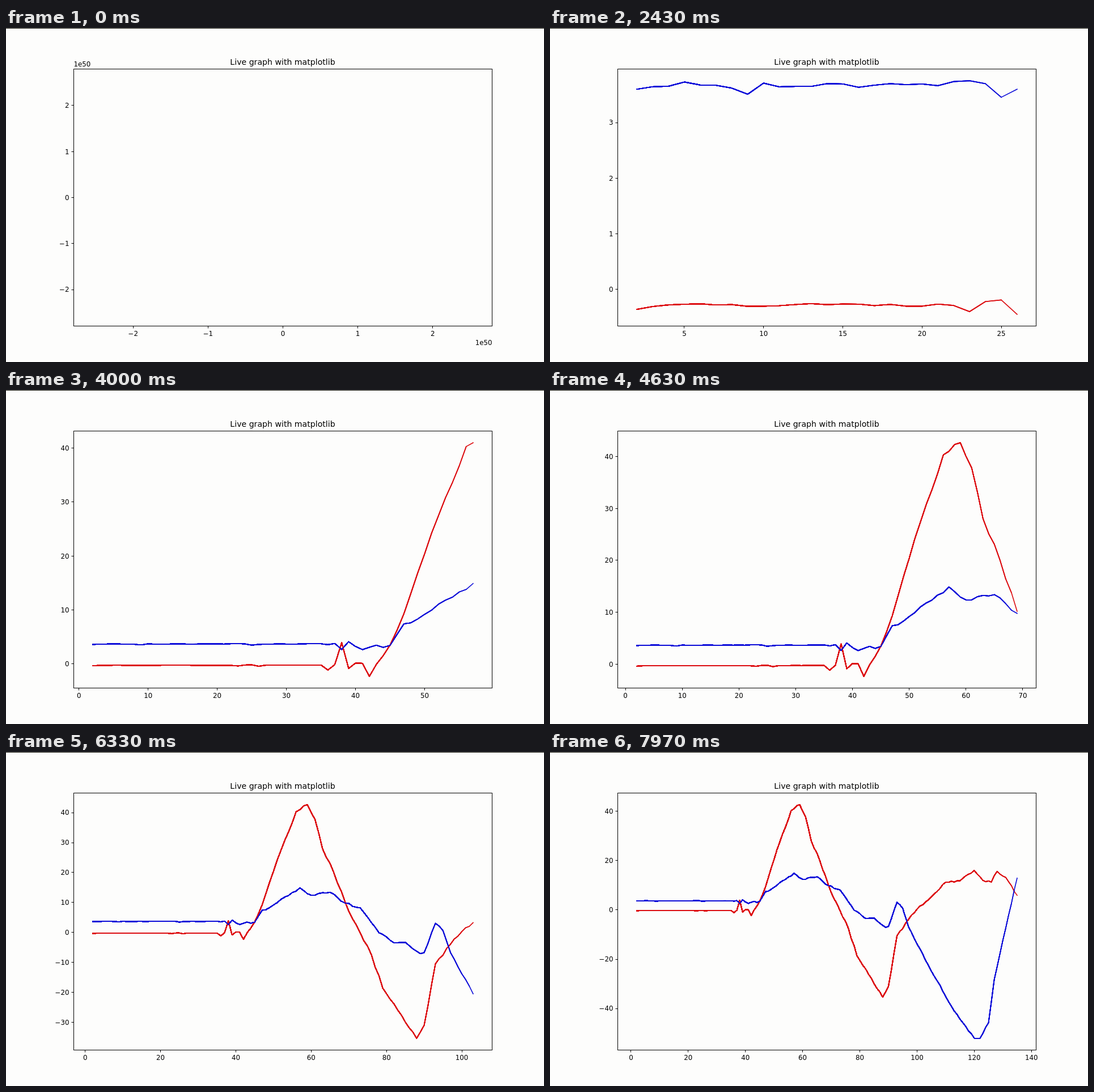
An HTML page with a canvas that plays this animation: 949x590 px, repeating every 8000 ms.

```html
<!DOCTYPE html>
<html lang="en">
<head>
<meta charset="utf-8">
<title>Live graph</title>
<style>
  html, body { margin: 0; width: 100%; height: 100%; overflow: hidden; background: #fdfdfc; }
  canvas { display: block; }
</style>
</head>
<body>
<canvas id="stage" width="949" height="590"></canvas>
<script>
const ctx = document.getElementById('stage').getContext('2d');
const LOOP = 8000;
const LEFT = 119.5, RIGHT = 857.5, TOP = 72.5, BOTTOM = 526.5;
const INK = '#000', PAPER = '#fdfdfc';
const FIRST_X = 2, LAST_X = 135, QUIET_UNTIL = 35;

// Turning points [x, y] of each curve; the samples between them follow by rule.
const redKeys = [
  [2, -.36], [4, -.28], [22, -.29], [23, -.4], [24, -.22], [25, -.19], [26, -.45], [27, -.26],
  [35, -.22], [36, -1.15], [37, -.15], [38, 3.92], [39, -.87], [40, .14], [41, .09], [42, -2.33],
  [45, 3.5], [47, 9.31], [52, 27.5], [56, 40.3], [59, 42.65], [61, 37.8], [63, 28], [66, 20],
  [70, 7], [76, -7.5], [79, -18.6], [88, -35.4], [90, -31], [93, -10.5], [98, -2.2], [110, 11.2],
  [115, 11.8], [120, 16], [123, 12], [126, 11.3], [128, 15.6], [131, 13.2], [135, 5.9]];
const blueKeys = [
  [2, 3.6], [5, 3.73], [9, 3.51], [10, 3.71], [12, 3.65], [24, 3.7], [25, 3.455], [26, 3.6],
  [37, 3.77], [38, 2.66], [39, 4.11], [41, 2.63], [42, 3.06], [45, 3.44], [47, 7.42], [48, 7.6],
  [57, 14.9], [60, 12.4], [65, 13.4], [69, 9.8], [73, 8.2], [78, -.1], [82, -3.5], [85, -3.3],
  [89, -7.1], [90, -6.75], [93, 3.05], [95, .6], [97, -6.75], [103, -20.5], [113, -41], [120, -52],
  [122, -52.1], [125, -45.8], [127, -28.3], [130, -12.4], [135, 12.9]];

function seededRandom(seed) {
  return () => (seed = seed * 16807 % 2147483647) / 2147483647;
}

// Straight runs between the turning points, roughened by sensor noise.
function makeSeries(keys, seed, quietNoise, activeNoise) {
  const random = seededRandom(seed), series = [];
  for (let x = FIRST_X, k = 0; x <= LAST_X; x++) {
    if (k < keys.length - 2 && x > keys[k + 1][0]) k++;
    const [[x0, y0], [x1, y1]] = keys.slice(k, k + 2);
    const noise = (random() * 2 - 1) * (x <= QUIET_UNTIL ? quietNoise : activeNoise);
    const onKey = x === x0 || x === x1;
    series.push(y0 + (y1 - y0) * (x - x0) / (x1 - x0) + (onKey ? 0 : noise));
  }
  return series;
}

const red = makeSeries(redKeys, 4711, 0.03, 0.45);
const blue = makeSeries(blueKeys, 977, 0.06, 0.3);

// While no data exists, every redraw widens the limits by a tenth.
const EMPTY_UNTIL = 1220, EMPTY_EXPONENT = 50;
const emptyLimit = step => 2.793 * 1.1 ** step;

function withMargin(min, max) {
  if (min === max) { min *= 0.95; max *= 1.05; }
  const pad = (max - min) * 0.05;
  return [min - pad, max + pad];
}

// At most nine intervals, at a round step.
function getTicks([min, max]) {
  const raw = (max - min) / 9;
  const mag = 10 ** Math.floor(Math.log10(raw));
  const step = [1, 2, 2.5, 5, 10].find(s => s * mag >= raw) * mag;
  const values = [];
  for (let i = Math.ceil(min / step); i * step <= max; i++) values.push(i * step);
  return { step, values };
}

function decimalsFor(step) {
  let d = 0;
  while (d < 4 && Math.abs(step * 10 ** d - Math.round(step * 10 ** d)) > 1e-6) d++;
  return d;
}

function text(str, x, y, align, size = 11.8) {
  ctx.font = `${size}px "DejaVu Sans", sans-serif`;
  ctx.textAlign = align;
  ctx.fillText(str, x, y);
}

function segment(x1, y1, x2, y2) {
  ctx.beginPath();
  ctx.moveTo(x1, y1);
  ctx.lineTo(x2, y2);
  ctx.stroke();
}

const snap = v => Math.floor(v) + 0.5;

function drawAxis(range, toPixel, isX, isEmpty) {
  const { step, values } = getTicks(range);
  const order = isEmpty ? Math.floor(Math.log10(Math.max(...values)) + 1e-9) : 0;
  const scale = 10 ** order, digits = decimalsFor(step / scale);
  for (const value of values) {
    const p = toPixel(value);
    const str = (value < 0 ? '\u2212' : '') + (Math.abs(value) / scale).toFixed(digits);
    if (isX) {
      segment(snap(p), BOTTOM, snap(p), BOTTOM + 4);
      text(str, p, 544, 'center');
    } else {
      segment(LEFT - 4, snap(p), LEFT, snap(p));
      text(str, LEFT - 8, Math.round(p + 4.3), 'right');
    }
  }
  if (isEmpty) {
    const str = '1e' + (EMPTY_EXPONENT + order);
    if (isX) text(str, RIGHT, 560, 'right');
    else text(str, LEFT, 68, 'left');
  }
}

// Each redraw adds another copy of the lines, so older parts look heavier.
function drawLines(count, px, py) {
  ctx.lineWidth = 1.6;
  ctx.lineJoin = 'round';
  ctx.lineCap = 'square';
  for (let n = 2; n <= count; n++) {
    for (const [series, color] of [[red, '#dc0c10'], [blue, '#0c0cd8']]) {
      ctx.strokeStyle = color;
      ctx.beginPath();
      for (let i = 0; i < n; i++) ctx.lineTo(px(FIRST_X + i), py(series[i]));
      ctx.stroke();
    }
  }
}

function draw(isEmpty, step) {
  let xRange, yRange;
  const count = isEmpty ? 0 : step;
  if (isEmpty) {
    const limit = emptyLimit(step);
    xRange = yRange = [-limit, limit];
  } else {
    const shown = [...red.slice(0, count), ...blue.slice(0, count)];
    xRange = withMargin(FIRST_X, FIRST_X + count - 1);
    yRange = withMargin(Math.min(...shown), Math.max(...shown));
  }
  const px = x => LEFT + (x - xRange[0]) / (xRange[1] - xRange[0]) * (RIGHT - LEFT);
  const py = y => BOTTOM - (y - yRange[0]) / (yRange[1] - yRange[0]) * (BOTTOM - TOP);

  ctx.fillStyle = PAPER;
  ctx.fillRect(0, 0, 949, 590);
  ctx.fillStyle = '#1e1e14';
  ctx.fillRect(0, 0, 949, 1);

  drawLines(count, px, py);

  ctx.fillStyle = ctx.strokeStyle = INK;
  ctx.lineWidth = 1;
  ctx.lineCap = 'butt';
  ctx.lineJoin = 'miter';
  ctx.strokeRect(LEFT, TOP, RIGHT - LEFT, BOTTOM - TOP);
  drawAxis(xRange, px, true, isEmpty);
  drawAxis(yRange, py, false, isEmpty);
  text('Live graph with matplotlib', 488, 65, 'center', 14.12);
}

let lastKey = '';
function frame() {
  const t = performance.now() % LOOP;
  const isEmpty = t < EMPTY_UNTIL;
  const step = isEmpty
    ? Math.min(22, Math.floor(t / 53))
    : Math.min(red.length, Math.max(1, Math.floor(t / 50.8 - 21.25) - FIRST_X + 1));
  const key = isEmpty + ':' + step;
  if (key !== lastKey) {
    draw(isEmpty, step);
    lastKey = key;
  }
  requestAnimationFrame(frame);
}
frame();
</script>
</body>
</html>
```
